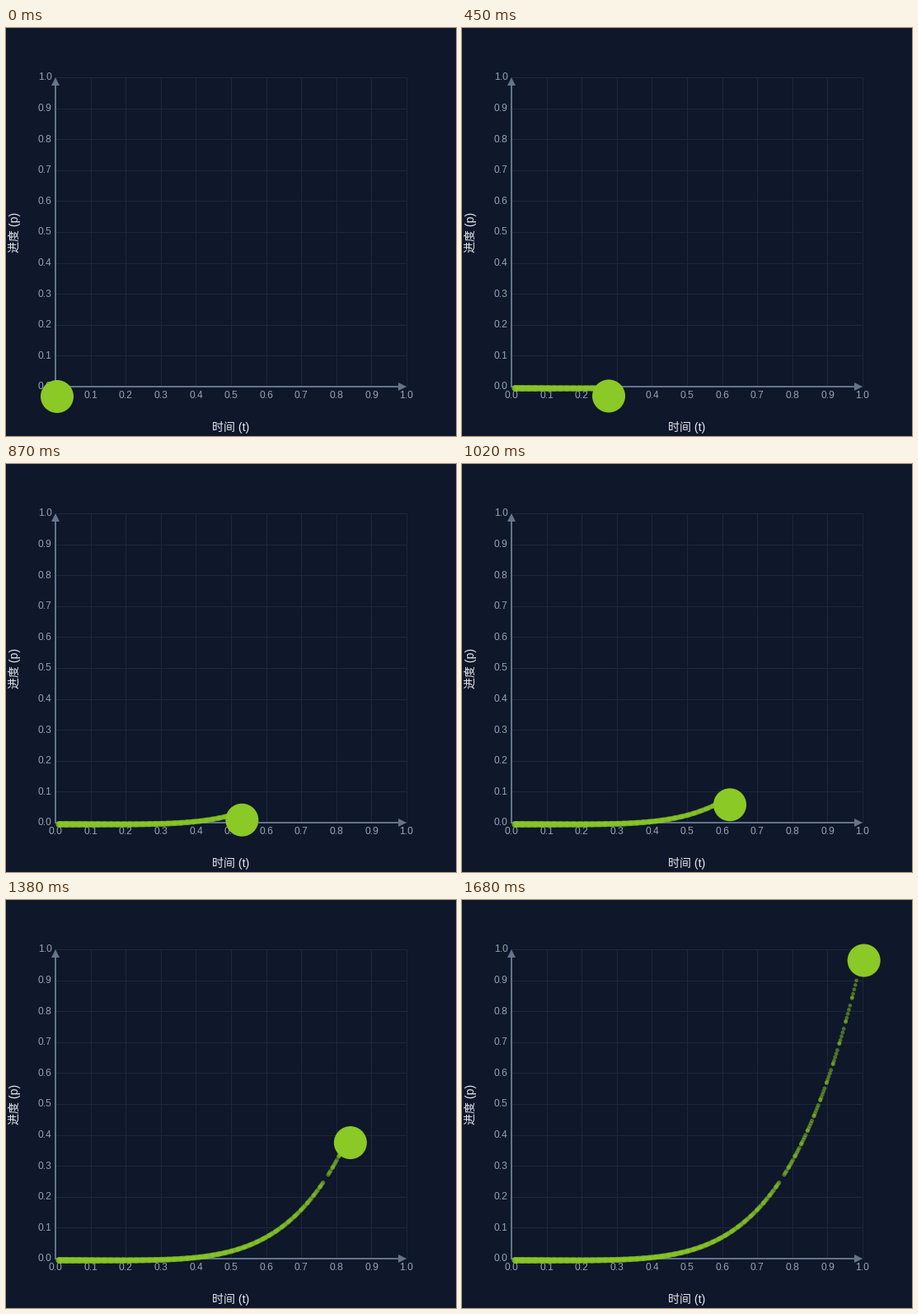
Animation, 546 px wide and 496 px high, one loop 1.71 s. Source, as a matplotlib script:

```python
import numpy as np
import matplotlib.pyplot as plt
from matplotlib.animation import FuncAnimation
from matplotlib.patches import Circle, Polygon

W, H, DPI = 546, 496, 100
PX = 72 / DPI  # points per pixel
STEP, FRAMES, DURATION = 30, 57, 1652
X0, X1, Y0, Y1 = 60, 486, 436, 60
BG, GRID, AXIS = "#0f172a", "#1d283a", "#64748b"
TICK, TITLE, LIME = "#94a3b8", "#e2e8f0", "#8ac926"

plt.rcParams["font.family"] = ["Liberation Sans", "Noto Sans CJK JP"]

fig = plt.figure(figsize=(W / DPI, H / DPI), dpi=DPI, facecolor=BG)
ax = fig.add_axes([0, 0, 1, 1])
ax.set_xlim(0, W)
ax.set_ylim(H, 0)
ax.axis("off")


def line(xs, ys, color, width, z):
    ax.plot(xs, ys, color=color, lw=width * PX, zorder=z,
            solid_capstyle="butt")


def label(x, y, text, size, color, ha="center", **kw):
    ax.text(x, y, text, fontsize=size * PX, color=color, ha=ha,
            va="baseline", zorder=3, **kw)


def ease(t):
    return t ** 5


def draw_chart():
    for i in range(11):
        gx = X0 + (X1 - X0) * i / 10
        gy = Y0 + (Y1 - Y0) * i / 10
        line([gx, gx], [Y0, Y1], GRID, 1, 1)
        line([X0, X1], [gy, gy], GRID, 1, 1)
        label(gx, 450.3, f"{i / 10:.1f}", 12, TICK)
        label(55.5, gy + 3.4, f"{i / 10:.1f}", 12, TICK, ha="right")
    line([X0, X0], [Y0 + 1, Y1 + 4], AXIS, 2, 2)
    line([X0 - 1, X1 - 4], [Y0, Y0], AXIS, 2, 2)
    for tip in ([(X0, Y1), (X0 - 5, Y1 + 10), (X0 + 5, Y1 + 10)],
                [(X1, Y0), (X1 - 10, Y0 - 5), (X1 - 10, Y0 + 5)]):
        ax.add_patch(Polygon(tip, fc=AXIS, lw=0, zorder=2))
    label((X0 + X1) / 2, 490, "时间 (t)", 14, TITLE)
    label(15, 248, "进度 (p)", 14, TITLE, rotation=90,
          rotation_mode="anchor")


def trail_times():
    # Dots come in bursts, with one longer stall
    burst = np.array([0, 1.2, 5.3, 10.5, 15.7, 20.9])
    times = (np.arange(55)[:, None] * STEP + 9 + burst).ravel()
    stalled = (times > 1257) & (times < 1279)
    return times[~stalled & (times < DURATION)]


draw_chart()

times = trail_times()
u = times / DURATION
spots = np.column_stack([62 - 1.2 * u + (X1 - X0) * u,
                         438 + 0.8 * u + (Y1 - Y0) * ease(u)])
sizes = (2 * (4 - 1.7 * u) * PX) ** 2

trail = ax.scatter(spots[:, 0], spots[:, 1], s=sizes, color=LIME,
                   alpha=0.5, linewidths=0, zorder=4)
ball = ax.add_patch(Circle((62, 448), 20, fc=LIME, lw=0, zorder=5))


def update(frame):
    now = frame * STEP
    t = min(now / DURATION, 0.9992)
    ball.center = (62 + (X1 - X0) * t, 448 + (Y1 - Y0) * ease(t))
    n = int(np.searchsorted(times, now, side="right"))
    trail.set_offsets(spots[:n])
    trail.set_sizes(sizes[:n])
    return trail, ball


anim = FuncAnimation(fig, update, frames=FRAMES, interval=STEP,
                     init_func=lambda: update(0), repeat=True,
                     repeat_delay=0)
plt.show()
```
